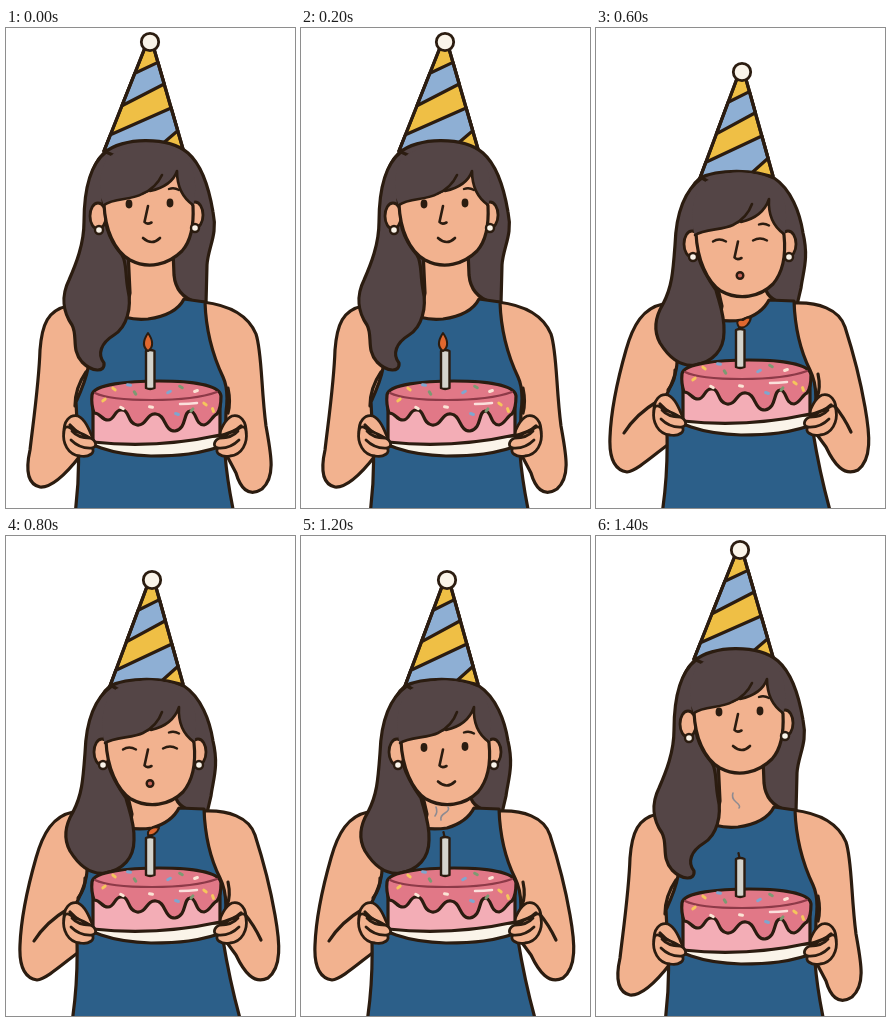
An HTML page for the animation above (1.6 s loop, 289 by 480 pixels).

```html
<!DOCTYPE html>
<html lang="en">
<head>
<meta charset="utf-8">
<title>Birthday wish</title>
<style>
  html, body { margin: 0; width: 100%; height: 100%; overflow: hidden; background: #fff; }
  svg { display: block; width: 100vw; height: 100vh; }
</style>
</head>
<body>
<svg viewBox="0 0 289 480"><g id="art" stroke-linecap="round" stroke-linejoin="round"></g></svg>
<script>
const INK = '#2b1c10', SKIN = '#f2b28f', HAIR = '#544546', DRESS = '#2c5f89',
      GOLD = '#efbf45', BLUE = '#8eafd4', CREAM = '#faf4e9', ICING = '#e17887', SPONGE = '#f3adb6';

const path = (d, fill = 'none', stroke = INK, w = 3.2) =>
  `<path d="${d}" fill="${fill}" stroke="${stroke}" stroke-width="${w}"/>`;
const oval = (x, y, rx, ry, fill, stroke = INK, w = 2.4) =>
  `<ellipse cx="${x}" cy="${y}" rx="${rx}" ry="${ry}" fill="${fill}" stroke="${stroke}" stroke-width="${w}"/>`;
const move = (x, y, inner) => `<g transform="translate(${x} ${y})">${inner}</g>`;

// The two body positions: standing tall and leaning in to blow
const tall = {
  hat: [144, 14, 98, 123, 177, 121],
  face: 0,
  cake: 0,
  ears: [92, 188, 189, 187],
  rings: [93, 202, 189, 200],
  back: 'M98 125C116 109 162 108 182 125C198 139 204 166 207 184C212 207 202 219 201 237L200 276L165 276L110 270L80 200C80 168 82 140 98 125Z',
  neck: 'M122 222L124 265Q122 280 112 289L155 306L190 274Q170 268 168 247L167 222Z',
  leftArm: 'M62 278C42 282 36 296 34 322C33 354 28 388 24 422C20 440 21 456 34 459C46 460 60 446 74 428L92 410L96 286Z',
  rightArm: 'M197 274C222 277 242 287 250 306C256 324 255 360 260 398C265 426 270 449 256 461C242 470 234 459 230 445L220 426L190 400Z',
  dress: 'M107 283Q121 293 142 291Q170 287 178 271L199 274C200 306 208 330 217 349Q223 362 220 384L219 426Q221 452 228 486L69 486Q74 448 72 414L70 374Q80 352 82 340L88 286Z',
  arms: 'M80 344Q69 360 69 378M222 360Q225 374 222 385',
  head: 'M98 176C99 201 108 223 124 232C143 242 163 236 176 223C185 213 188 198 187 178L176 148L130 132L104 152Z',
  fringe: 'M98 177C107 170 126 172 144 163C155 160 167 155 171 143C171 158 177 170 187 177Q195 142 174 124Q133 104 100 132Q89 153 98 177Z',
  strands: 'M98 177C107 170 126 172 136 166Q150 160 156 147M144 163Q166 158 171 143C171 158 177 170 187 177',
  lock: 'M100 124C82 138 78 166 78 194C78 216 70 236 63 252C55 268 57 284 66 297C72 308 65 322 76 334C86 344 99 345 98 335C91 326 95 315 108 307C121 299 126 279 122 262C119 246 121 234 116 227Q105 214 101 200L97 172Q102 150 118 132Z',
};
const lean = {
  hat: [146, 44, 104, 150, 177, 148],
  face: 35.5,
  cake: -21,
  ears: [96, 216, 192, 216],
  rings: [97, 229, 193, 229],
  back: 'M104 150C121 141 160 141 178 150C195 161 204 185 207 205C213 230 207 244 205 260L201 277L165 280L110 270L84 220C84 194 87 164 104 150Z',
  neck: 'M120 252L126 278Q125 288 118 291L153 306L188 275Q170 272 168 255Z',
  leftArm: 'M67 276C47 280 37 297 30 322C22 350 15 383 14 409C13 430 18 442 31 444C42 443 64 421 88 405L95 340L92 290Z',
  rightArm: 'M198 275C222 274 243 281 249 299C257 324 264 350 269 379C274 407 276 431 262 442C248 449 238 436 230 419L219 404L190 380Z',
  dress: 'M104 288Q126 295 146 292Q166 286 173 272L198 273C199 302 206 326 214 342Q222 358 219 381L217 404Q224 447 235 486L66 486Q72 447 71 405L70 368Q81 346 81 334L92 296Z',
  arms: 'M79 342Q80 352 72 362M62 373Q40 386 28 405M222 346Q225 360 221 369M238 377Q248 389 255 404',
  head: 'M100 205C101 231 111 254 125 263C143 273 164 269 177 256C187 244 190 226 188 207L177 177L130 162L106 180Z',
  fringe: 'M99 207C108 201 127 202 145 194C157 190 169 184 173 171C172 187 178 199 188 206Q196 169 174 151Q135 136 105 157Q91 180 99 207Z',
  strands: 'M99 207C108 201 127 202 137 197Q151 190 156 176M145 194Q167 189 173 171C172 187 178 199 188 206',
  lock: 'M106 150C87 163 80 188 79 217C77 244 76 259 67 276C58 291 58 304 64 315C72 328 83 339 99 337C117 334 128 322 128 304C129 288 123 274 120 262Q107 244 102 228L98 204Q104 175 120 158Z',
};

function hat([x, y, lx, ly, rx, ry]) {
  const top = y - 7;
  const edge = (bx, by, k) => `${x + (bx - x) * k} ${top + (by - top) * k}`;
  const L = k => edge(lx, ly, k), R = k => edge(rx, ry, k);
  const cone = `M${x} ${top}L${L(1)}L${R(1)}Z`;
  return path(cone, GOLD) +
    path(`M${L(.33)}L${R(.24)}L${R(.43)}L${L(.61)}Z`, BLUE) +
    path(`M${L(.86)}L${R(.64)}L${R(.84)}L${x + 4} ${ly}L${L(1)}Z`, BLUE) +
    path(cone) + oval(x, y, 8.7, 8.7, CREAM, INK, 2.8);
}

function features(mood) {
  const eyes = mood === 'blow'
    ? path('M117 178Q123 174 130 178M157 177Q164 173 171 177', 'none', INK, 2.4) +
      oval(144, 212, 3.3, 3.3, '#c96559')
    : oval(123, 176, 3.4, 4.4, INK, 'none') + oval(164, 175, 3.4, 4.4, INK, 'none') +
      path('M137 210Q146 218 154 210', 'none', INK, 2.6);
  return eyes +
    path('M142 178L138.5 194Q141 197 145.5 194.5', 'none', INK, 2.6) +
    path('M163 161Q168 159 173 162', 'none', INK, 2.4);
}

const SPRINKLES = [[108, 361, 40], [123, 357, 10], [129, 365, 60], [116, 380, 30], [98, 372, -40],
  [163, 364, -30], [175, 359, 30], [190, 363, -20], [199, 376, 40], [171, 386, 20], [186, 382, -50],
  [145, 379, 10], [207, 382, 70]];

function cake() {
  const tints = ['#f5c65c', '#7fa6cf', '#7c9a72', '#fbe5d6'];
  const bits = SPRINKLES.map(([x, y, a], i) =>
    `<rect x="-3" y="-1.5" width="6" height="3" rx="1.5" fill="${tints[i % 4]}" transform="translate(${x} ${y}) rotate(${a})"/>`).join('');
  return path('M64 397Q74 408 88 412L212 408Q228 405 235 398Q239 405 224 415C194 427 170 428 145 428C110 427 74 418 64 397Z', CREAM) +
    path('M87 366L87 414Q150 421 214 407L214 366Z', SPONGE) +
    path('M86 367C87 356 124 353 153 353C187 353 214 357 215 368C215 376 214 382 211 386C206 388 204 396 198 397C189 397 191 383 184 383C177 384 181 401 169 403C158 403 160 387 150 386C140 385 141 398 131 397C121 396 124 381 115 382C108 382 109 392 102 392C95 392 95 385 88 385Q85 376 86 367Z', ICING) +
    path('M89 365Q103 372 146 372T211 364', 'none', '#8d3a48', 2) + bis(bits) +
    path('M140 323Q144 321 148.500 323L148.500 360Q144 362 140 360Z', '#d4d3cc', INK, 2.4) +
    path('M143.500 322L142.500 317', 'none', INK, 2.2);
}
function bis(bits) {
  return bits + path('M174 376Q183 376 191 375', 'none', '#fbe0dc', 2.5);
}

// Draws a left-hand shape and its mirror image
const pair = d => path(d, SKIN, INK, 2.8) +
  `<g transform="translate(298) scale(-1 1)">${path(d, SKIN, INK, 2.8)}</g>`;
const THUMB = 'M58 406C57 393 64 386 72 388C79 391 83 401 87 411Z';
const FINGERS = 'M58 403C56 415 62 427 74 428C83 430 90 424 86 420C92 419 90 412 84 410C80 407 71 404 66 401Q59 396 58 403ZM66 403Q72 410 84 410M65 412Q74 421 86 420';

const flames = {
  up: 'M142 323C135 318 138 311 142 305C147 312 148 319 142 323Z',
  bent: 'M143 320C139 314 143 312 147 313Q150 310 155 310C154 317 149 322 143 320Z',
  low: 'M142 320C141 314 148 311 153 313C151 319 146 321 142 320Z',
};
const smokes = [
  'M146 296Q142 290 147 286T147 277M149 291Q153 287 149 283',
  'M134 280Q137 276 135 271M140 284Q139 280 144 277T147 271',
  'M137 257Q135 262 140 266T143 272',
];

// body, mood, flame, smoke for each 200 ms step
const STEPS = [
  [tall, 'smile', 'up'], [tall, 'smile', 'up'], [lean, 'smile', 'up'], [lean, 'blow', 'bent'],
  [lean, 'blow', 'low'], [lean, 'blow', '', 0], [lean, 'smile', '', 1], [tall, 'smile', '', 2],
];

function draw([p, mood, flame, smoke]) {
  const [ax, ay, bx, by] = p.ears, [lx, ly, rx, ry] = p.rings;
  const ear = (x, y) => oval(x, y, 8, 13, SKIN, INK, 2.8);
  return hat(p.hat) + path(p.back, HAIR) + path(p.neck, SKIN) +
    path(p.leftArm, SKIN) + path(p.rightArm, SKIN) + path(p.dress, DRESS) + path(p.arms) +
    path(p.lock, HAIR) + ear(ax, ay) + ear(bx, by) + path(p.head, SKIN) +
    path(p.fringe, HAIR, HAIR, 1) + path(p.strands, 'none', INK, 2.6) +
    oval(lx, ly, 4, 4, CREAM) + oval(rx, ry, 4, 4, CREAM) +
    move(0, p.face, features(mood)) +
    move(0, p.cake, pair(THUMB) + cake() + pair(FINGERS) +
      (flame ? path(flames[flame], '#e0682f', INK, 2) : '')) +
    (smoke >= 0 ? path(smokes[smoke], 'none', '#8e8b91', 1.6) : '');
}

const art = document.getElementById('art');
let shown = -1;
function tick(now) {
  const step = Math.floor(now % 1600 / 200);
  if (step !== shown) {
    shown = step;
    art.innerHTML = draw(STEPS[step]);
  }
  requestAnimationFrame(tick);
}
tick(0);
</script>
</body>
</html>
```
